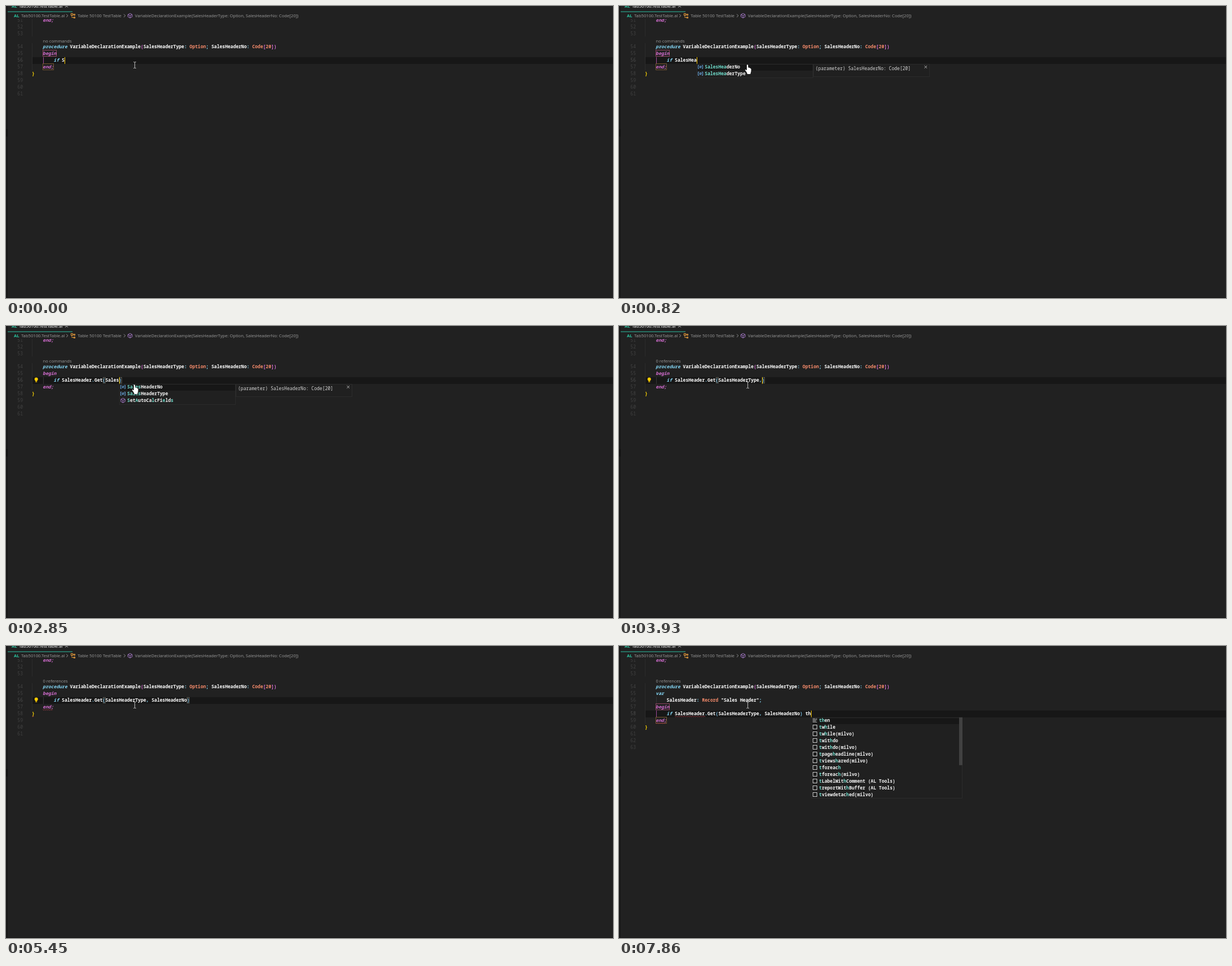
These frames come from a looping animation (1078 by 519 pixels, 8 s). An HTML page with a canvas:

```html
<!DOCTYPE html>
<html lang="en">
<head>
<meta charset="utf-8">
<title>Code completion</title>
<style>
html, body { margin: 0; width: 100%; height: 100%; overflow: hidden; background: #212121; }
canvas { display: block; width: 1078px; height: 519px; }
</style>
</head>
<body>
<canvas id="stage" width="1078" height="519"></canvas>
<script>
const g = document.getElementById('stage').getContext('2d');
const LOOP = 8000, CW = 4.83, LH = 11.95, X0 = 65.3, Y0 = 72.5;
const CODE = "8.05px 'Noto Sans Mono', monospace";
const UI = "7.66px 'Open Sans', sans-serif";
const C = {
  bg: '#212121', panel: '#202020', white: '#ffffff', key: '#86d9f8', type: '#f78c6c', orchid: '#da70d6',
  blue: '#75beff', gold: '#ffd700', purple: '#b180d7', teal: '#2bc4a0', match: '#6fdccb',
  dim: '#9c9c9c', num: '#424242', red: '#b8434d'
};

// Completion entries: icon kind and label
const params = [['param', 'SalesHeaderNo'], ['param', 'SalesHeaderType']];
const few = [...params, ['method', 'SetAutoCalcFields']];
const many = [...params, ['field', 'SystemId'],
  ...['SecurityFiltering', 'SelectStr', 'SerialNumber', 'ServiceInstanceId', 'Session', 'SessionId',
    'SessionInformation', 'SetAutoCalcFields', 'SetCurrentKey'].map(s => ['method', s])];
const snippets = [['keyword', 'then'],
  ...['twhile', 'twhile(milvo)', 'twithdo', 'twithdo(milvo)', 'tpageheadline(milvo)', 'tviewshared(milvo)',
    'tforeach', 'tforeach(milvo)', 'tLabelWithComment (AL Tools)', 'treportWithBuffer (AL Tools)',
    'tviewdetached(milvo)'].map(s => ['snippet', s])];

const infoNo = '(parameter) SalesHeaderNo: Code[20]';
const infoType = '(parameter) SalesHeaderType: Option';
const call = 'SalesHeader.Get(';
const args = call + 'SalesHeaderType, ';
const show = (list, query, info = infoNo, sel = 0) => ({ list, query, info, sel });

// Each step overrides part of the editor state
const steps = [
  [0, { text: 'S', tail: '', caret: true, pop: null, lens: 'no commands', bulb: false, decl: false, wave: false, endWave: false, braceWave: false }],
  [150, { text: 'Sa', pop: show(many, 's') }],
  [280, { text: 'Sal', pop: show(few, 'sal') }],
  [410, { text: 'Sales', pop: show(few, 'sales') }],
  [540, { text: 'SalesH', pop: show(params, 'salesh') }],
  [820, { text: 'SalesHea', pop: show(params, 'saleshea') }],
  [970, { text: 'SalesHead', pop: show(params, 'saleshead') }],
  [1100, { text: 'SalesHeader', pop: show(params, 'salesheader') }],
  [1240, { text: 'SalesHeader.', pop: null }],
  [1510, { text: 'SalesHeader.G' }],
  [1690, { text: 'SalesHeader.Ge' }],
  [1860, { text: 'SalesHeader.Get' }],
  [2030, { text: call, tail: ')', bulb: true }],
  [2430, { text: call + 'S', pop: show(many, 's') }],
  [2570, { text: call + 'Sa', pop: show(few, 'sa') }],
  [2710, { text: call + 'Sale', pop: show(few, 'sale') }],
  [2850, { text: call + 'Sales', pop: show(few, 'sales') }],
  [3250, { pop: show(few, 'sales', infoNo, 1) }],
  [3380, { pop: show(few, 'sales', infoType, 1) }],
  [3510, { text: call + 'SalesHeaderType', pop: null }],
  [3650, { lens: '0 references' }],
  [3930, { text: call + 'SalesHeaderType,' }],
  [4060, { text: args }],
  [4190, { text: args + 's', lens: 'no commands' }],
  [4330, { pop: show(many, 's', '') }],
  [4460, { pop: show(many, 's') }],
  [4590, { caret: false }],
  [4870, { text: args + 'SalesHeaderNo', pop: null, caret: true }],
  [5020, { lens: '0 references', endWave: true, braceWave: true }],
  [5450, { caret: false }],
  [5850, { text: args + 'SalesHeaderNo)', tail: '', caret: true }],
  [6000, { wave: true }],
  [6400, { decl: true }],
  [6940, { caret: false }],
  [7340, { text: args + 'SalesHeaderNo) ', caret: true, bulb: false }],
  [7510, { text: args + 'SalesHeaderNo) t', pop: show(snippets, 't', '') }],
  [7690, { text: args + 'SalesHeaderNo) th', braceWave: false }],
  [7860, { pop: show(snippets, 'th', '') }]
];

const stateAt = t => Object.assign({}, ...steps.filter(s => s[0] <= t).map(s => s[1]));
const col = n => X0 + n * CW;
const row = n => Y0 + n * LH;

function put(str, x, y, color, font) {
  g.font = font;
  g.fillStyle = color;
  g.fillText(str, x, y + 2.9);
}
function rect(x, y, w, h, color) {
  g.fillStyle = color;
  g.fillRect(x, y, w, h);
}
function frame(x, y, w, h, color) {
  g.strokeStyle = color;
  g.lineWidth = 1;
  g.strokeRect(Math.round(x) + .5, Math.round(y) + .5, Math.round(w) - 1, Math.round(h) - 1);
}
function path(points, color, width = .9, close = false) {
  g.beginPath();
  points.forEach(([x, y]) => g.lineTo(x, y));
  if (close) g.closePath();
  g.strokeStyle = color;
  g.lineWidth = width;
  g.stroke();
}
// Tokens are [text, color, italic]
function code(x, y, ...tokens) {
  for (const [str, color, italic] of tokens) {
    put(str, x, y, color, (italic ? 'italic ' : '') + '600 ' + CODE);
    x += str.length * CW;
  }
}
function wave(x, y, w) {
  const pts = [];
  for (let i = 0; i <= w; i += 1.75) pts.push([x + i, y + (pts.length % 2 ? 1.2 : 0)]);
  path(pts, C.red, .7);
}
function cross(x, y, r, color) {
  path([[x - r, y - r], [x + r, y + r]], color);
  path([[x - r, y + r], [x + r, y - r]], color);
}

const icons = {
  method(x, y, color = C.purple) {
    path([[x, y - 4], [x + 3.7, y - 2], [x + 3.7, y + 2], [x, y + 4], [x - 3.7, y + 2], [x - 3.7, y - 2]], color, .9, true);
    path([[x - 3.4, y - 1.8], [x, y], [x + 3.4, y - 1.8]], color);
    path([[x, y], [x, y + 4]], color);
  },
  field(x, y) {
    path([[x + 1, y - 3], [x + 4, y - 1.4], [x + 4, y + 1], [x - 1, y + 3.4], [x - 4, y + 1.6], [x - 4, y - .6]], C.blue, .9, true);
    path([[x - 4, y - .6], [x - 1, y + .9], [x + 4, y - 1.4]], C.blue);
    path([[x - 1, y + .9], [x - 1, y + 3.2]], C.blue);
  },
  param(x, y) {
    for (const d of [-1, 1])
      path([[x + d * 2.5, y - 3], [x + d * 4, y - 3], [x + d * 4, y + 3], [x + d * 2.5, y + 3]], C.blue);
    g.beginPath();
    g.arc(x, y, 1.7, 0, 7);
    g.stroke();
    path([[x - 1.7, y + 1.7], [x + 1.7, y - 1.7]], C.blue, .7);
  },
  snippet(x, y) { frame(x - 4, y - 4, 8, 8, '#c8c8c8'); },
  keyword(x, y) {
    [5, 8, 6, 8].forEach((w, i) => rect(x - 4, y - 3.5 + i * 2, w, 1, '#b5b5b5'));
    rect(x + 2, y - 3.5, 2, 1, '#b5b5b5');
  }
};

function chevron(x) { path([[x - 1.3, 14.5], [x + 1.3, 17.2], [x - 1.3, 20]], C.dim); }

function header() {
  rect(0, 0, 1078, 23, C.bg);
  put('AL', 10, .3, C.teal, "bold 7.6px 'Open Sans', sans-serif");
  put('Tab50100.TestTable.al', 23, .3, '#ffffff', '500 ' + UI);
  cross(107.5, 0, 2.4, '#dddddd');
  rect(3, 9.6, 115, 1.1, '#2bb096');
  put('AL', 14, 17.3, C.teal, "bold 7.6px 'Open Sans', sans-serif");
  put('Tab50100.TestTable.al', 27, 17.3, C.dim, UI);
  chevron(108.5);
  const o = '#e39a3c';
  frame(115, 13, 4, 4, o);
  path([[117, 17], [117, 20.5], [120, 20.5]], o);
  path([[119, 15], [121, 15]], o);
  frame(120, 14, 3, 3, o);
  frame(120, 19, 3, 3, o);
  put('Table 50100 TestTable', 127.3, 17.3, C.dim, UI);
  chevron(210.5);
  icons.method(220.3, 17.2);
  put('VariableDeclarationExample(SalesHeaderType: Option, SalesHeaderNo: Code[20])', 229, 17.3, C.dim, UI);
}

function bulb(y) {
  g.fillStyle = '#ffcc00';
  g.beginPath();
  g.arc(53.7, y - 1.8, 3, 0, 7);
  g.fill();
  rect(52.2, y + .6, 3, 1.5, '#ffcc00');
  rect(52.2, y + 2.6, 3, 1, '#d9ad00');
}

function popup(p, x, y) {
  const wide = p.list === snippets, w = wide ? 269 : 207, h = p.list.length * LH;
  const top = y + 6.5;
  rect(x, top, w, h, C.panel);
  rect(x, top + p.sel * LH, w, LH, '#171717');
  frame(x, top, w, h + 1, '#2b2b2b');
  p.list.forEach(([kind, label], i) => {
    const cy = y + (i + 1) * LH;
    icons[kind](x + 6.7, cy);
    let k = 0;
    [...label].forEach((ch, n) => {
      const hit = k < p.query.length && ch.toLowerCase() === p.query[k];
      if (hit) k++;
      put(ch, x + 14.3 + n * CW, cy, hit ? C.match : '#f4f4f4', 'bold ' + CODE);
    });
  });
  if (p.list.length > 11) rect(x + w - 6, top, 6, wide ? 85 : 31, '#414141');
  if (!p.info) return;
  rect(x + w, top, 207, 22.5, C.panel);
  frame(x + w, top, 207, 23, '#2b2b2b');
  put(p.info, x + w + 4, y + 15, '#d6d6d6', '500 ' + CODE);
  cross(x + 406.7, y + 12, 2.3, '#c4c4c4');
}

function pointer(hand) {
  if (!hand) {
    path([[226.5, 99.5], [228, 99.5], [228.7, 100.3], [229.4, 99.5], [231, 99.5]], '#d5d5d5');
    path([[228.7, 100], [228.7, 110]], '#d5d5d5');
    path([[226.5, 110.5], [228, 110.5], [228.7, 109.7], [229.4, 110.5], [231, 110.5]], '#d5d5d5');
    return;
  }
  g.beginPath();
  [[227, 105], [228, 104], [229.2, 105], [229.4, 109.5], [231, 109.5], [234, 111], [234.8, 112.5],
    [234.5, 116.5], [233.3, 121], [228, 121], [226.6, 117.5], [224, 114], [224.4, 112.8], [227, 114.3]]
    .forEach(([x, y]) => g.lineTo(x, y));
  g.closePath();
  g.strokeStyle = '#111';
  g.lineWidth = 1.2;
  g.stroke();
  g.fillStyle = '#fff';
  g.fill();
}

function callLine(s, y) {
  const full = s.text + s.tail;
  const parts = full.match(/[().,]|[^().,]+/g).map(p =>
    [p, /[()]/.test(p) ? '#7fc8f0' : /[.,]/.test(p) ? C.key : C.white]);
  code(col(4), y, ['if', C.key, true], [' ', C.white], ...parts);
}

function draw(t) {
  const s = stateAt(t), shift = s.decl ? 2 : 0;
  const begin = row(1 + shift), y = row(2 + shift), end = row(3 + shift), brace = row(4 + shift);
  const caretX = col(7 + s.text.length);
  const pair = s.tail || s.text.endsWith(')');
  const lineTop = y - 5.5;

  rect(0, 0, 1078, 519, C.bg);
  rect(46, lineTop, 1032, 12, '#171717');
  rect(46, 23, 1, 31, '#2c2c2c');
  rect(46, 66, 1, end - 60, '#2c2c2c');
  if (s.decl) rect(66, row(2) - 6, 1, LH, '#343434');

  for (let n = 51; n <= 61 + shift; n++) {
    const cy = n < 54 ? 48.6 + (n - 53) * LH : row(n - 54);
    put(String(n), 20.3, cy, n === 56 + shift ? '#4c4c4c' : C.num, CODE);
  }
  code(X0, 48.6 - 2 * LH, ['end;', C.orchid, true]);
  put(s.lens, 65.5, 62.2, C.dim, UI);
  code(X0, Y0, ['procedure', C.key, true], [' VariableDeclarationExample', C.white], ['(', C.orchid],
    ['SalesHeaderType', C.white], [': ', C.key], ['Option', C.type], ['; ', C.key], ['SalesHeaderNo', C.white],
    [': ', C.key], ['Code', C.type], ['[', C.orchid], ['20', C.type], ['])', C.orchid]);
  if (s.decl) {
    code(X0, row(1), ['var', C.key, true]);
    code(col(4), row(2), ['SalesHeader', C.white], [': ', C.key], ['Record', C.type],
      [' "Sales Header"', C.white], [';', C.key]);
  }

  if (pair) {
    rect(66, lineTop, 1, LH, '#363636');
    const open = col(7 + call.length - 1);
    const close = s.tail ? caretX : caretX - CW;
    for (const bx of [open, close]) frame(bx, lineTop, 5, 11, '#5c5c55');
  } else {
    rect(66, lineTop, 1, LH, '#a04a9a');
    frame(65, begin - 6, 25, 12, '#8c4360');
    frame(65, end - 6, 20, 12, '#74552f');
  }
  code(X0, begin, ['begin', C.orchid, true]);
  callLine(s, y);
  code(X0, end, ['end;', C.orchid, true]);
  code(46, brace, ['}', C.gold]);
  if (s.wave) wave(col(7), y + 4.5, 12 * CW - 2);
  if (s.endWave) wave(X0, end + 4.5, 4 * CW - 1);
  if (s.braceWave) wave(46, brace + 4.5, 5);
  if (s.bulb) bulb(y);
  if (s.caret) rect(Math.round(caretX), lineTop, 1, 12, '#ffcc00');

  header();
  rect(0, 0, 3, 519, '#191919');
  rect(0, 219, 3, 13, '#111');
  rect(0, 518, 1078, 1, '#151515');
  if (s.pop) popup(s.pop, Math.round(caretX), y);
  pointer(s.pop && caretX < 229);
}

const start = performance.now();
function tick() {
  draw((performance.now() - start) % LOOP);
  requestAnimationFrame(tick);
}
tick();
</script>
</body>
</html>
```
